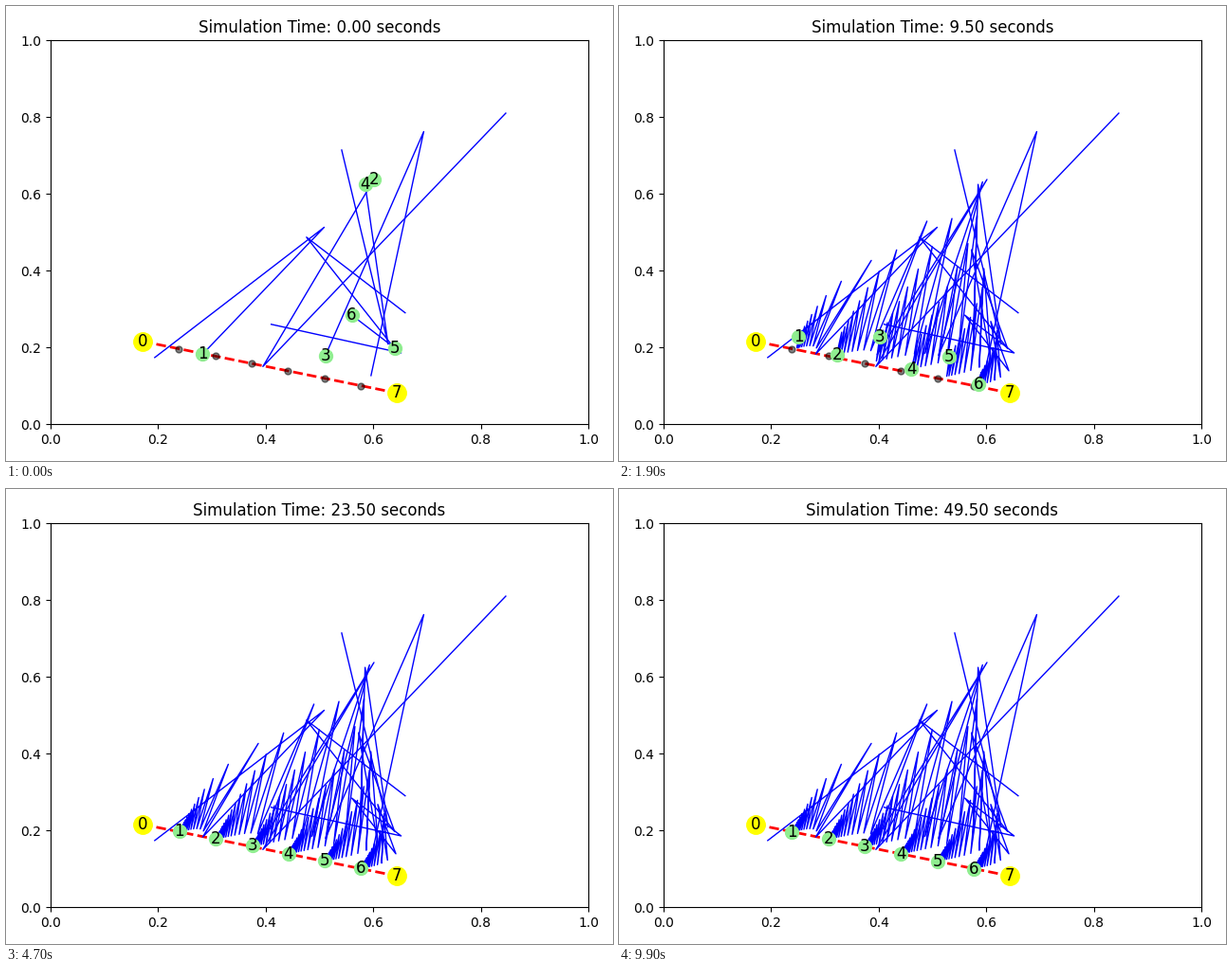
A matplotlib script for the animation above (10000 ms loop, 640 by 480 pixels).

```python
import numpy as np
import matplotlib.pyplot as plt
from matplotlib.animation import FuncAnimation

WIDTH, HEIGHT, DPI = 640, 480, 100
FRAMES, INTERVAL = 100, 100
DT = 0.5
LEAD = 2  # averaging steps already taken at time zero

# Nodes 0 and 7 are fixed anchors, the others move
start = np.array([
    (0.1715, 0.2160), (0.1940, 0.1740), (0.8465, 0.8105), (0.5960, 0.1270),
    (0.5415, 0.7145), (0.6595, 0.2905), (0.4105, 0.2605), (0.6445, 0.0815),
])


def simulate(steps):
    """Each inner node jumps to the midpoint of its two neighbours."""
    path = [start]
    for _ in range(steps):
        nxt = path[-1].copy()
        nxt[1:-1] = (path[-1][:-2] + path[-1][2:]) / 2
        path.append(nxt)
    return np.array(path)


path = simulate(FRAMES + LEAD)
anchors = start[[0, -1]]
goals = np.linspace(start[0], start[-1], len(start))[1:-1]

plt.rcParams["font.family"] = "DejaVu Sans"
fig, ax = plt.subplots(figsize=(WIDTH / DPI, HEIGHT / DPI), dpi=DPI)
fig.subplots_adjust(left=46.8 / WIDTH, right=614 / WIDTH,
                    bottom=38.7 / HEIGHT, top=443.7 / HEIGHT)
ax.set(xlim=(0, 1), ylim=(0, 1))
title = ax.set_title("Simulation Time: 0.00 seconds", fontsize=12)

ax.plot(*anchors.T, "r--", lw=2, zorder=2)
ax.plot(*goals.T, "ko", ms=5, alpha=0.5, zorder=2.1)
trails = [ax.plot([], [], "b-", lw=1, zorder=2.2)[0] for _ in goals]
ax.plot(*anchors.T, "o", color="yellow", ms=14, zorder=3)
nodes, = ax.plot(*goals.T, "o", color="lightgreen", ms=10, zorder=3)
labels = [ax.text(x, y, str(i), fontsize=12, ha="center", va="center", zorder=4)
          for i, (x, y) in enumerate(start)]


def update(n):
    k = n + LEAD
    for i, trail in enumerate(trails, 1):
        trail.set_data(*path[:k + 1, i].T)
        labels[i].set_position(path[k, i])
    nodes.set_data(*path[k, 1:-1].T)
    title.set_text(f"Simulation Time: {n * DT:.2f} seconds")
    return [*trails, nodes, *labels, title]


anim = FuncAnimation(fig, update, frames=FRAMES, interval=INTERVAL,
                     repeat=True, repeat_delay=0, blit=False)
plt.show()
```
